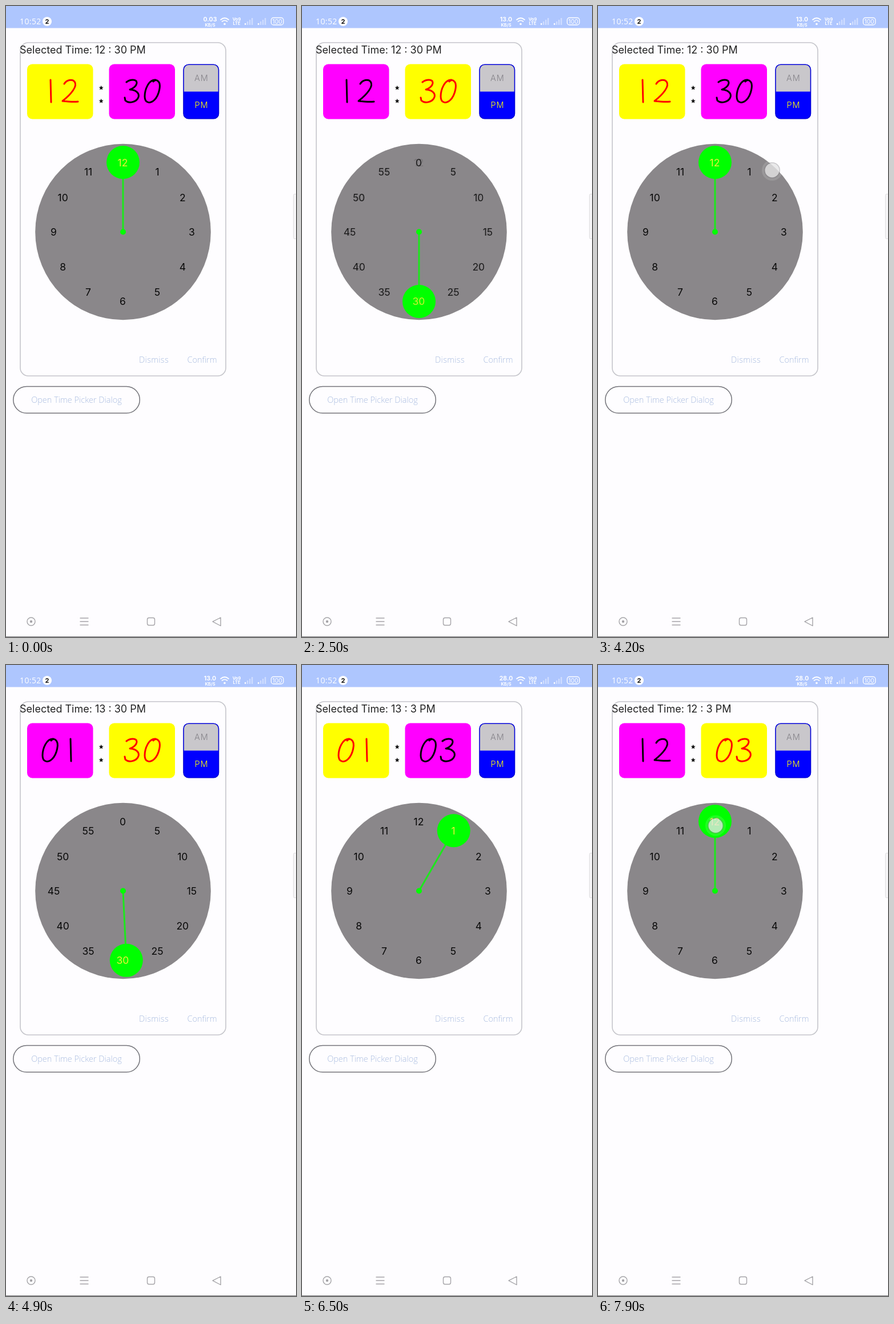
An HTML page for the animation above (8000 ms loop, 508 by 1102 pixels).

```html
<!DOCTYPE html>
<html lang="en">
<head>
<meta charset="utf-8">
<title>Time picker</title>
<style>
  html, body { margin: 0; width: 100%; height: 100%; overflow: hidden; background: #fefdff; }
  svg { display: block; width: 100%; height: 100%; }
  text { font-family: Inter, sans-serif; }
  .hand { font-family: "Open Sans", sans-serif; font-weight: 300; font-size: 14.5px; }
  .mid { text-anchor: middle; }
  .bold { font-weight: 700; }
  .link { fill: #a9bce0; }
  .line { fill: none; stroke-linecap: round; stroke-linejoin: round; }
  .label { font-size: 17.5px; text-anchor: middle; }
</style>
</head>
<body>
<svg viewBox="0 0 508 1102">
  <defs>
    <clipPath id="headClip"><circle class="head" r="29"/></clipPath>
    <clipPath id="hourClip"><rect x="37" y="101.5" width="115.5" height="96" rx="9"/></clipPath>
    <clipPath id="minuteClip"><rect x="180.5" y="101.5" width="115.5" height="96" rx="9"/></clipPath>
    <clipPath id="periodClip"><rect x="311" y="102" width="62" height="95" rx="9"/></clipPath>
  </defs>
  <rect width="508" height="1102" fill="#fefdff"/>

  <!-- Status bar -->
  <rect width="508" height="38.5" fill="#aec6fe"/>
  <g fill="#fff">
    <text class="hand" x="24" y="32" letter-spacing=".4" style="font-weight:400;font-size:14px">10:52</text>
    <circle cx="72" cy="27" r="8"/>
    <text class="mid bold" x="72" y="31" font-size="11" fill="#111">2</text>
    <text id="rate" class="mid bold" x="357.5" y="27" font-size="10.5"></text>
    <text class="mid bold" x="357.5" y="35.500" font-size="7.500">KB/S</text>
    <circle cx="383" cy="31.500" r="1.800"/>
    <g class="line" stroke="#fff" stroke-width="1.700">
      <path d="M376 24Q383 18 390 24M378.500 27Q383 23.500 387.500 27"/>
      <rect x="464.500" y="20.500" width="21.500" height="12.500" rx="4" stroke-width="1.300"/>
    </g>
    <text class="mid bold" x="404" y="26" font-size="7.500">Vo9</text>
    <text class="mid bold" x="404" y="33" font-size="7.500">LTE</text>
    <text class="mid" x="475.200" y="31" font-size="10.500">100</text>
    <g id="signals"></g>
  </g>

  <!-- Dialog -->
  <rect class="line" x="25" y="64" width="360" height="582" rx="14" stroke="#c5c5cb" stroke-width="1.600"/>
  <text id="title" x="24" y="82.500" font-size="18" fill="#222"></text>
  <rect id="hourCard" x="37" y="101.500" width="115.500" height="96" rx="9"/>
  <rect id="minuteCard" x="180.500" y="101.500" width="115.500" height="96" rx="9"/>
  <path id="hourDigits" class="line" stroke-width="3"/>
  <path id="minuteDigits" class="line" stroke-width="3"/>
  <path id="colon" fill="#111"/>
  <g clip-path="url(#periodClip)">
    <path d="M311 102h62v48h-62z" fill="#c9c7cb"/>
    <path d="M311 149.500h62v48h-62z" fill="#00f"/>
  </g>
  <rect class="line" x="311" y="102.300" width="61.500" height="94.500" rx="9" stroke="#0000d8" stroke-width="1.600"/>
  <g class="hand mid" letter-spacing="1">
    <text x="342.500" y="130.500" fill="#858389">AM</text>
    <text x="342.500" y="178" fill="#ff0">PM</text>
  </g>

  <!-- Clock face -->
  <circle cx="205" cy="394.500" r="153.800" fill="#8a878a"/>
  <g id="plain"></g>
  <g fill="#1cf01c">
    <line id="needle" x1="205" y1="394.500" stroke="#1ce81c" stroke-width="3"/>
    <circle cx="205" cy="394.500" r="5" fill="#0f0"/>
    <circle class="head" r="29" fill="#0f0"/>
  </g>
  <g id="lit" clip-path="url(#headClip)"></g>

  <text class="hand mid link" x="259" y="622.500" letter-spacing=".3">Dismiss</text>
  <text class="hand mid link" x="343.500" y="622.500">Confirm</text>
  <rect class="line" x="12.800" y="664.500" width="221.500" height="46.500" rx="23.250" stroke="#74747a" stroke-width="1.500"/>
  <text class="hand mid link" x="123.500" y="692.500">Open Time Picker Dialog</text>

  <!-- Edge handle and navigation bar -->
  <rect x="503.500" y="328.500" width="8" height="78" rx="2" fill="#f7f6f8" stroke="#dedde0"/>
  <g class="line" stroke="#a5a4a8" stroke-width="1.400">
    <circle cx="44" cy="1075" r="7"/>
    <circle cx="44" cy="1075" r="1.500" fill="#a5a4a8"/>
    <path d="M130 1069h14M130 1075h14M130 1081h14M376 1068v14.500L362 1075.200z"/>
    <rect x="247.500" y="1068.500" width="13" height="13" rx="3"/>
  </g>
  <path d="M0 1101.500h508" stroke="#77767a"/>

  <circle id="ripple" r="38" fill="#000"/>
  <g id="touch">
    <circle r="18" fill="#fff" opacity=".13"/>
    <circle r="14" fill="#77757a" opacity=".4"/>
    <circle r="12.500" fill="#fff" opacity=".62"/>
  </g>
</svg>
<script>
const LOOP = 8000, STEP = 100;
const CENTER = { x: 205, y: 394.5 };
const $ = id => document.getElementById(id);

// Pen strokes of the ten digits in a 30 x 41 cell
const STROKES = [
  "M20 1C8 0 1 18 1 30C1 42 11 43 18 36C26 28 31 8 24 3C22 1 19 1 16 4",
  "M15 1L16 40",
  "M4 8C8 1 18-1 22 4C28 12 16 26 1 38C10 39 20 40 28 39",
  "M4 5C10 0 22-1 22 6C22 12 14 17 10 18C20 18 27 24 25 31C22 40 8 43 2 37L1 32",
  "M14 1L2 26L27 25M20 15L18 40",
  "M25 2L9 3L5 18C15 13 25 19 22 30C19 39 9 42 2 37",
  "M18 1C8 10 2 23 3 32C6 43 21 41 23 30C24 21 11 19 4 29",
  "M0 12L0 5C8 3 19 4 27 2C20 14 15 27 12 40",
  "M23 5C13-3 3 7 11 16C22 23 26 33 18 39C6 43-1 31 10 22C19 15 26 10 23 5",
  "M23 8C14-3 2 6 5 17C10 25 21 16 23 8C23 19 20 30 17 40",
];

const polar = (degrees, radius, c = CENTER) => {
  const a = degrees * Math.PI / 180;
  return { x: c.x + radius * Math.sin(a), y: c.y - radius * Math.cos(a) };
};
const linear = k => k;
const smooth = k => k * k * (3 - 2 * k);

function track(keys, t, ease = smooth) {
  const i = keys.findIndex(k => k[0] > t);
  if (i === 0) return keys[0][1];
  if (i < 0) return keys[keys.length - 1][1];
  const [t0, a] = keys[i - 1], [t1, b] = keys[i];
  return a + (b - a) * ease((t - t0) / (t1 - t0));
}

const NEEDLE = [[2200, 0], [2500, 180], [3100, 180], [3400, 360], [4250, 360], [4450, 390],
  [4500, 390], [4800, 540], [6100, 378], [6350, 390]];
const MINUTE_FACE = [[2200, 0], [2550, 1], [3100, 1], [3450, 0],
  [4500, 0], [4800, 1], [6100, 1], [6400, 0]];
const MINUTE_DRAG = [[5150, 540], [5700, 383.5]];
const HOUR_DRAG = [[6700, 402.8], [7200, 582.6], [7650, 720.5]];

const at = (x, y) => () => ({ x, y });
const drag = (keys, radii) => t => polar(track(keys, t, linear), track(radii, t, linear));
const PRESSES = [
  { from: 1400, to: 1600, where: at(104, 154), card: "hour" },
  { from: 2000, to: 2200, where: at(242, 154), card: "minute" },
  { from: 2900, to: 3100, where: at(98, 154), card: "hour" },
  { from: 4200, to: 4400, where: at(305, 287) },
  { from: 5100, to: 5700, where: drag(MINUTE_DRAG, [[5150, 128], [5700, 115]]) },
  { from: 5900, to: 6100, where: at(98, 154), card: "hour" },
  { from: 6700, to: 7900, where: drag(HOUR_DRAG, [[6700, 143], [7200, 136], [7650, 114]]) },
];

function needleAngle(t) {
  if (t >= 6700) return Math.round(track(HOUR_DRAG, t, linear) / 30) * 30;
  if (t >= 5150 && t < 6100) return Math.floor(track(MINUTE_DRAG, t, linear) / 6) * 6;
  return track(NEEDLE, t);
}

function stateAt(t) {
  const angle = needleAngle(t);
  let hour = t < 4300 ? 12 : 1;
  if (t >= 6700) hour = (angle / 30 - 1) % 12 + 1;
  const minute = t < 5150 ? 30 : t < 6100 ? angle / 6 % 60 : 3;
  const minuteMode = [[2200, 3100], [4500, 6100], [7800, LOOP]].some(([a, b]) => t >= a && t < b);
  return { angle, hour, minute, minuteMode };
}

function addFace(parent, fill, texts) {
  const labels = texts.map((text, i) => {
    const p = polar(i * 30, 121, { x: 204.5, y: 395 });
    return `<text class="label" x="${p.x}" y="${p.y + 6.2}">${text}</text>`;
  });
  parent.insertAdjacentHTML("beforeend", `<g fill="${fill}">${labels.join("")}</g>`);
  return parent.lastElementChild;
}
const HOURS = [...Array(12)].map((_, i) => i || 12);
const MINUTES = [...Array(12)].map((_, i) => i * 5);
const faces = [[$("plain"), "#080808"], [$("lit"), "#eeee38"]].map(([parent, fill]) =>
  [addFace(parent, fill, HOURS), addFace(parent, fill, MINUTES)]);

const star = (cx, cy) => "M" + [...Array(10)].map((_, i) => {
  const p = polar(i * 36, i % 2 ? 1.9 : 4.2, { x: cx, y: cy });
  return `${p.x} ${p.y}`;
}).join("L") + "Z";
$("colon").setAttribute("d", star(166.7, 143) + star(166.7, 166));

$("signals").innerHTML = [418, 441].map(x => [0, 1, 2, 3].map(i =>
  `<rect x="${x + i * 4}" y="${30 - i * 3}" width="2.4" height="${3 + i * 3}" opacity="${i ? .4 : .9}"/>`
).join("")).join("");

// Shifts absolute stroke coordinates into a digit cell
const placeDigit = (digit, dx, dy) => STROKES[digit].replace(/(-?\d+)[ ]?(-?\d+)/g,
  (_, x, y) => `${+x + dx} ${+y + dy} `);

function drawCard(name, value, x, active) {
  const [tens, units] = String(value).padStart(2, "0");
  $(name + "Card").setAttribute("fill", active ? "#ff0" : "#f0f");
  const digits = $(name + "Digits");
  digits.setAttribute("d", placeDigit(tens, x, 128) + placeDigit(units, x + 35, 128));
  digits.setAttribute("stroke", active ? "#f00" : "#000");
}

function drawTouch(t) {
  const press = PRESSES.find(p => t >= p.from && t < p.to + 250);
  const level = press ? Math.min(1, 1 - (t - press.to) / 250) : 0;
  const { x, y } = press ? press.where(t) : CENTER;
  const place = `translate(${x} ${y})`;
  $("touch").setAttribute("transform", place);
  $("touch").setAttribute("opacity", level);
  $("ripple").setAttribute("opacity", press && press.card ? level * .055 : 0);
  $("ripple").setAttribute("cx", x);
  $("ripple").setAttribute("cy", y);
  $("ripple").setAttribute("clip-path", `url(#${press && press.card || "hour"}Clip)`);
}

function draw(t) {
  const { angle, hour, minute, minuteMode } = stateAt(t);
  const tip = polar(angle, 121.5);
  document.querySelectorAll(".head").forEach(head => {
    head.setAttribute("cx", tip.x);
    head.setAttribute("cy", tip.y);
  });
  $("needle").setAttribute("x2", tip.x);
  $("needle").setAttribute("y2", tip.y);
  const minuteFace = track(MINUTE_FACE, t, linear);
  faces.forEach(([hours, minutes]) => {
    hours.setAttribute("opacity", 1 - minuteFace);
    minutes.setAttribute("opacity", minuteFace);
  });
  $("title").textContent = `Selected Time: ${hour % 12 + 12} : ${minute} PM`;
  $("rate").textContent = t < 1700 ? "0.03" : t < 5300 ? "13.0" : "28.0";
  drawCard("hour", hour, 63, !minuteMode);
  drawCard("minute", minute, 207, minuteMode);
  drawTouch(t);
}

const start = performance.now();
function tick() {
  const t = (performance.now() - start) % LOOP;
  draw(Math.floor(t / STEP) * STEP);
  requestAnimationFrame(tick);
}
tick();
</script>
</body>
</html>
```
